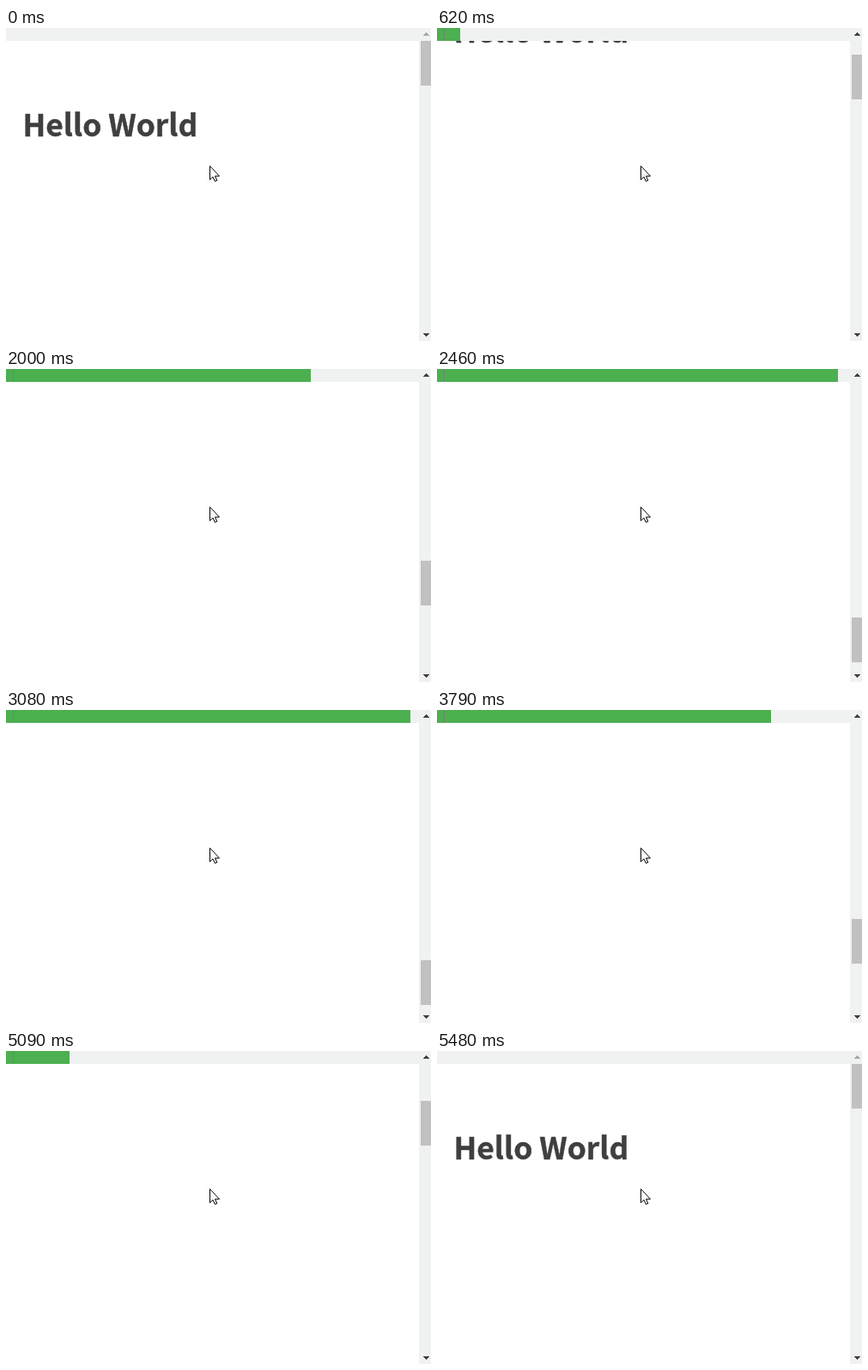
These frames come from a looping animation (495x364 px, 5.94 s). An HTML page:

```html
<!DOCTYPE html>
<html lang="en">
<head>
<meta charset="utf-8">
<title>Scroll indicator</title>
<style>
  html, body { margin: 0; width: 100%; height: 100%; overflow: hidden; background: #fff; }
  svg { display: block; }
  text {
    font: 700 35.4px "Source Sans Pro", "Noto Sans CJK JP", "Noto Sans CJK SC", "Noto Sans CJK", "Open Sans", sans-serif;
    fill: #3f3f41; stroke: #3f3f41; stroke-width: .4px;
  }
</style>
</head>
<body>
<svg width="495" height="364" viewBox="0 0 495 364">
  <text id="title" x="19.5" y="126">Hello World</text>
  <path fill="#f0f1f1" d="M0 0H495V364H481V15H0z"/>
  <rect id="bar" height="15" fill="#4caf50"/>
  <rect id="seam" x="8" width="1" height="15" fill="#6a8a6c"/>
  <rect id="thumb" x="483" width="12" height="52" fill="#c1c1c1"/>
  <g shape-rendering="crispEdges">
    <path id="up" d="M485.5 9h8l-4-4z"/>
    <path id="down" d="M485.5 355h8l-4 4z"/>
  </g>
  <path fill="#fff" stroke="#000" d="M237.5 160.5v16l3.5-3.3 2.4 5.1 2.4-1-2.3-5.1h5z"/>
</svg>
<script>
const LOOP = 5940, FULL = 481, TRAVEL = 282, PAGE = 1973;
const TICK = 76.6, SPEED = 18.55;

// Arrow key presses: a tap and a hold each way; lag is in ticks
const presses = [
  { at: 70, to: 8.5, lag: 1.3 },
  { at: 530, to: FULL, lag: 1.3 },
  { at: 2920, to: 471, lag: 1.3 },
  { at: 3480, to: 0, lag: 0.6 }
];

// Each press speeds up smoothly to a steady scroll and stops at its goal
function barWidth(t) {
  let width = 0;
  for (const { at, to, lag } of presses) {
    if (t < at) break;
    const n = Math.floor((t - at) / TICK) + 1;
    const moved = SPEED * (n - lag * (1 - Math.exp(-n / lag)));
    const gap = to - width;
    width += Math.sign(gap) * Math.min(moved, Math.abs(gap));
  }
  return width;
}

const $ = id => document.getElementById(id);
const set = (id, name, value) => $(id).setAttribute(name, value);
const arrow = (id, active) => set(id, "fill", active ? "#404040" : "#a3a9ad");

function draw(t) {
  const width = barWidth(t), part = width / FULL;
  set("title", "transform", `translate(0 ${-Math.round(part * PAGE)})`);
  set("bar", "width", Math.round(width));
  set("seam", "visibility", width > 8 ? "visible" : "hidden");
  set("thumb", "y", 15 + Math.round(part * TRAVEL));
  arrow("up", part > 0);
  arrow("down", part < 1);
}

const start = performance.now();
function frame() {
  draw((performance.now() - start) % LOOP);
  requestAnimationFrame(frame);
}
frame();
</script>
</body>
</html>
```
